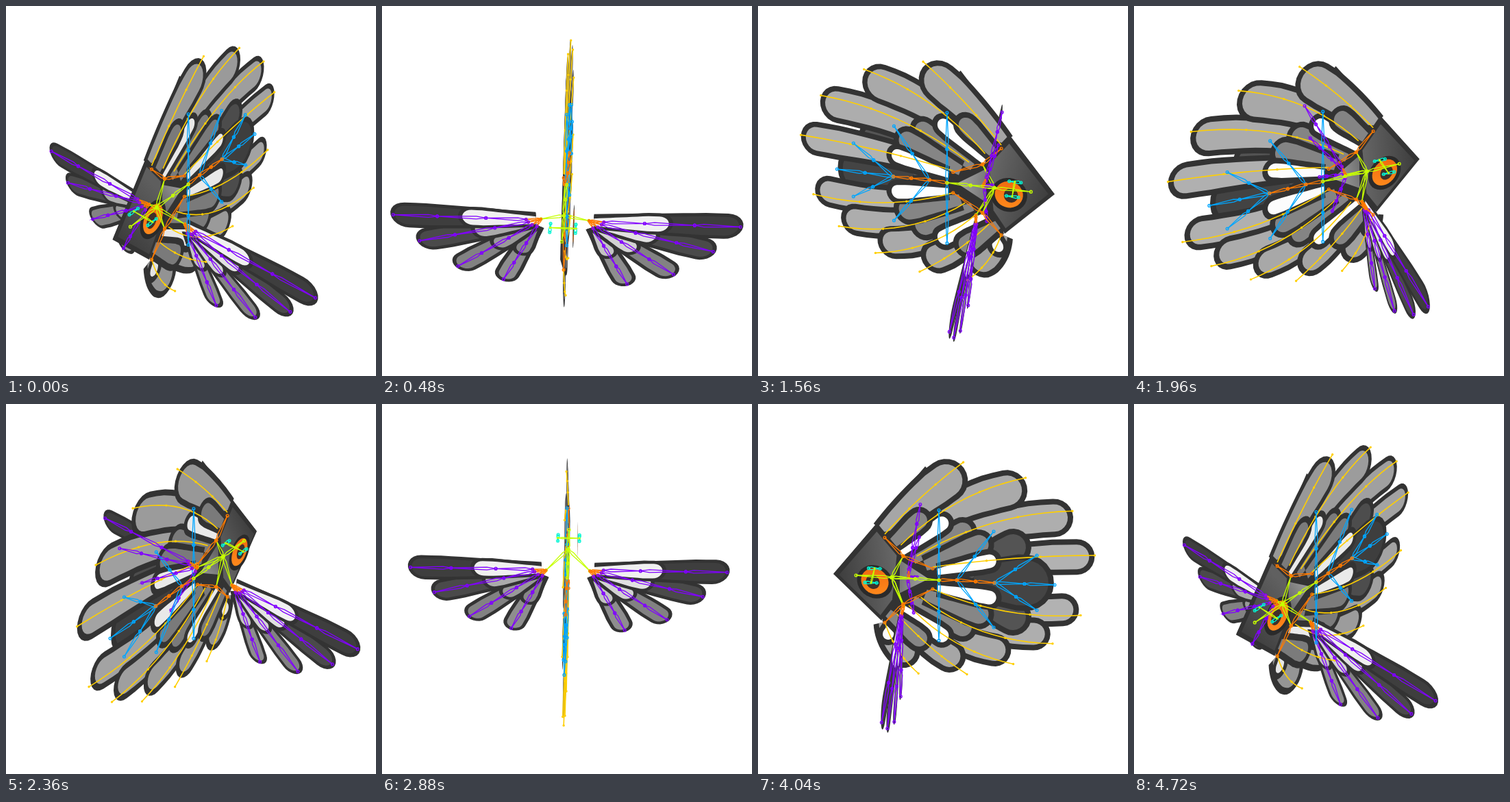
Animation of 540 by 540 pixels, one loop 4760 ms. Source, as an HTML page with a canvas:

```html
<!DOCTYPE html>
<html lang="en">
<head>
<meta charset="utf-8">
<title>Bird rig turntable</title>
<style>
html, body { margin: 0; width: 100%; height: 100%; overflow: hidden; background: #fff; }
canvas { display: block; width: 540px; height: 540px; }
</style>
</head>
<body>
<canvas id="stage" width="540" height="540"></canvas>
<script>
const ctx = document.getElementById('stage').getContext('2d');
const LOOP = 4760, STEP = 40, FACING_RIGHT = 1710, SIDE_VIEW = 4040;
const CX = 270, CY = 256, CAMERA = 940, SIN = 0.62, COS = 0.785;
const OUTLINE = 51, RIM = 8, DEG = Math.PI / 180;
const YELLOW = '#ffcf00', BLUE = '#00a6ff', PURPLE = '#8000ff';
const ORANGE = '#ff7a00', LIME = '#c6ff00', CYAN = '#00f5d4';

const turn = t => {
  const a = (t - FACING_RIGHT) / LOOP * 2 * Math.PI;
  return { c: Math.cos(a), s: Math.sin(a) };
};
let view = turn(0);

// Model axes: x forward, y up, z sideways.
function project([x, y, z]) {
  const u = x * view.c + z * view.s, w = z * view.c - x * view.s;
  const k = CAMERA / (CAMERA - w * COS - y * SIN);
  return [CX + u * k, CY - (y * COS - w * SIN) * k];
}

// The body is laid out as a side view and lifted onto the plane z = 0.
const side = turn(SIDE_VIEW);
function lift([px, py]) {
  const a = px - CX, b = CY - py, dx = -side.s * COS;
  const m = CAMERA * side.c + a * dx, n = a * SIN;
  const p = CAMERA * side.s * SIN + b * dx, q = CAMERA * COS + b * SIN;
  const det = m * q - n * p;
  return [CAMERA * (a * q - b * n) / det, CAMERA * (b * m - a * p) / det, 0];
}

const mix = (a, b, f) => a + (b - a) * f;
const between = (a, b, f) => a.map((v, i) => mix(v, b[i], f));
const range = (n, make) => Array.from({ length: n }, (_, i) => make(i));
const gray = v => { v = Math.round(v); return `rgb(${v},${v},${v})`; };

// Path from a to b, bowed sideways by the given amount.
function arc(a, b, bow = 0, n = 12) {
  const dx = b[0] - a[0], dy = b[1] - a[1], len = Math.hypot(dx, dy) || 1;
  return range(n + 1, i => {
    const f = i / n, off = 4 * f * (1 - f) * bow / len;
    return [a[0] + dx * f + dy * off, a[1] + dy * f - dx * off];
  });
}

function outlineOf(spine, radius, inset, taper) {
  const n = spine.length - 1, left = [], right = [];
  let angle = 0;
  spine.forEach(([x, y], i) => {
    const p = spine[Math.max(0, i - 1)], q = spine[Math.min(n, i + 1)];
    angle = Math.atan2(q[1] - p[1], q[0] - p[0]);
    const r = radius * mix(taper, 1, Math.min(1, i / n * 1.2)) - inset;
    left.push([x + Math.sin(angle) * r, y - Math.cos(angle) * r]);
    right.unshift([x - Math.sin(angle) * r, y + Math.cos(angle) * r]);
  });
  const tip = range(11, i => {
    const a = angle - Math.PI / 2 + Math.PI * (i + 1) / 12;
    return [spine[n][0] + Math.cos(a) * (radius - inset), spine[n][1] + Math.sin(a) * (radius - inset)];
  });
  return [...left, ...tip, ...right];
}

const makeFeather = (spine, r, tone, place = lift, rim = RIM, taper = 0.7) => ({
  tone,
  outer: outlineOf(spine, r, 0, taper).map(place),
  inner: outlineOf(spine, r, rim, taper).map(place)
});

function paint(points, fill) {
  ctx.beginPath();
  points.forEach(p => ctx.lineTo(...project(p)));
  ctx.closePath();
  ctx.fillStyle = fill;
  ctx.fill();
}

function drawFeathers(list, light) {
  for (const f of list) {
    paint(f.outer, gray(OUTLINE));
    paint(f.inner, gray(f.tone * light));
  }
}

// Fins fan out to an ellipse; the feathers end on a smaller one than their bones.
const onFan = (angle, rx, ry) =>
  [275 + rx * Math.cos(angle * DEG), 240 - ry * Math.sin(angle * DEG)];

function makeFin(up, i) {
  const f = i / (up > 0 ? 3 : 4);
  const angle = up > 0 ? 7 + 25.5 * i : -26 - 18.7 * i;
  const root = [255 - 70 * f, 254 - up * (16 + 48 * f)];
  const bow = up * 17 * Math.abs(Math.sin(2 * angle * DEG));
  return {
    feather: makeFeather(arc(root, onFan(angle * 1.08, 192, 128), bow * 0.8),
      up > 0 ? 26 + 2 * i : 24, 178 - 4 * i),
    bone: arc(root, onFan(angle, 218, 156), bow).map(lift)
  };
}
const finParts = [...range(4, i => makeFin(1, i)), ...range(5, i => makeFin(-1, i))];
const fins = finParts.map(f => f.feather);

const tail = [
  ...[1, -1].map(up => makeFeather(arc([288, 258 - 6 * up], [372, 260 - 51 * up]), 27, 84)),
  makeFeather(arc([315, 258], [391, 261]), 41, 68)
];

// Two mirrored fans of short feathers, the white ones above the gray.
function makeCovert(up, k) {
  const f = k / 4, angle = (18 + 18 * k) * DEG, white = k % 3 === 0;
  const tip = [235 + 108 * Math.cos(angle), 256 - up * 86 * Math.sin(angle)];
  const root = [262 - 72 * f, 257 - up * (12 + 36 * f)];
  return makeFeather(arc(root, tip), white ? 18 : 23 - f * 3, white ? 255 : 134);
}
const coverts = [2, 1, 0, 3, 4].flatMap(k => [makeCovert(1, k), makeCovert(-1, k)]);
const whitePatch = makeFeather(arc([193, 322], [190, 336]), 16, 250);

const crest = [[110, 248], [244, 91], [275, 125], [200, 215]].map(lift);
const mantle = [[178, 188], [255, 172], [300, 255], [250, 335], [182, 318]].map(lift);
const throat = [[200, 214], [264, 256], [200, 287]].map(lift);
const headRim = [[110, 248], [174, 174], [208, 215], [200, 290], [180, 316]].map(lift);
const toward = (pts, center, f) => pts.map(p => between(center, p, f));

const ROOT = [34, -26], WING_X = 57;

function makeWing(sign) {
  const place = ([z, y]) => [WING_X, y, sign * z];
  const at = (i, reach) => {
    const f = i / 3, angle = -64 * Math.pow(1 - f, 1.3) * DEG, len = (139 + 73 * f) * reach;
    return [ROOT[0] + len * Math.cos(angle), ROOT[1] + len * Math.sin(angle)];
  };
  const quill = (i, reach, width, tone) => {
    const r = (19 + 1.6 * i) * width, start = [ROOT[0] + 7, ROOT[1] - 10 + 3 * i];
    return makeFeather(arc(start, at(i, reach - (r - 4) / (139 + 24 * i))), r, tone, place, 6, 0.65);
  };
  const layer = (reach, width, tone) => range(4, i => quill(i, reach, width, tone(i)));
  return {
    root: [55, ROOT[1], sign * ROOT[0]],
    bones: range(4, i => [0.1, 0.37, 0.7, 1].map(f => place(at(i, f)))),
    quills: layer(1, 1, i => i < 2 ? 142 - 12 * i : 98 - 12 * i),
    near: layer(0.54, 0.85, i => 195 + 15 * i),
    far: layer(0.54, 0.85, i => i < 3 ? 135 + 18 * i : 240)
  };
}
const wings = { '1': makeWing(1), '-1': makeWing(-1) };

function drawWing(wing, isNear) {
  drawFeathers(wing.quills, 1);
  drawFeathers(isNear ? wing.near : wing.far, 1);
}

const ellipse = (x, y, rx, ry, z) => range(32, i => {
  const a = i * Math.PI / 16;
  return [x + rx * Math.cos(a), y + ry * Math.sin(a), z];
});

function ramp(a, b, from, to) {
  const g = ctx.createLinearGradient(...project(a), ...project(b));
  g.addColorStop(0, from);
  g.addColorStop(1, to);
  return g;
}

function drawHead(near, light) {
  const z = near * 14, back = [65, 20, 0];
  paint(headRim, gray(OUTLINE));
  paint(toward(headRim, [100, 0, near * 8], 0.86), ramp(headRim[0], back, gray(58), gray(104 * light)));
  paint(ellipse(98, 1, 26, 31, z), gray(42));
  paint(ellipse(98, 2, 20, 24, z), ramp([98, 28, z], [98, -26, z], '#f06a10', '#ff8a1c'));
  paint(ellipse(101, 1, 10, 13, z), '#40302a');
}

function joint(x, y, r) {
  ctx.beginPath();
  ctx.arc(x, y, r, 0, 7);
  ctx.stroke();
}

// A slim kite with a ring at each end.
function bone(a, b, color, width = 2, r = 1.9) {
  const [ax, ay] = project(a), [bx, by] = project(b);
  const len = Math.hypot(bx - ax, by - ay) || 1;
  const nx = (ay - by) / len * width, ny = (bx - ax) / len * width;
  const mx = mix(ax, bx, 0.2), my = mix(ay, by, 0.2);
  ctx.strokeStyle = color;
  ctx.lineWidth = 1.3;
  ctx.beginPath();
  ctx.moveTo(ax, ay);
  ctx.lineTo(mx + nx, my + ny);
  ctx.lineTo(bx, by);
  ctx.lineTo(mx - nx, my - ny);
  ctx.closePath();
  ctx.stroke();
  joint(ax, ay, r);
  joint(bx, by, r);
}

function chain(a, b, color, parts = 1) {
  for (let i = 0; i < parts; i++) {
    bone(between(a, b, i / parts), between(a, b, (i + 1) / parts), color);
  }
}

const HUB = lift([195, 253]), NOSE = lift([143, 250]), RUMP = lift([264, 257]);
const FORK = lift([290, 257]), STERN = lift([345, 261]);

function drawBones() {
  ctx.strokeStyle = YELLOW;
  ctx.lineWidth = 1.6;
  for (const fin of finParts) {
    ctx.beginPath();
    fin.bone.forEach(p => ctx.lineTo(...project(p)));
    ctx.stroke();
    [4, 8, 12].forEach(i => joint(...project(fin.bone[i]), 0.9));
  }
  for (const sign of [1, -1]) {
    const wing = wings[sign];
    bone(HUB, wing.root, LIME);
    for (const b of wing.bones) {
      bone(wing.root, b[0], ORANGE, 1.5, 1.2);
      for (let i = 0; i < 3; i++) bone(b[i], b[i + 1], PURPLE);
    }
    bone([112, 2, sign * 17], [95, 2, sign * 17], CYAN);

    const girdle = lift([212, 257 - 35 * sign]);
    bone(HUB, girdle, LIME);
    chain(girdle, lift([185, 257 - 62 * sign]), ORANGE);
    chain(girdle, lift([255, 255 - 15 * sign]), ORANGE);
    chain(RUMP, lift([264, 250 - 95 * sign]), BLUE, 2);
    chain(FORK, lift([344, 256 - 70 * sign]), BLUE, 2);
    chain(STERN, lift([407, 261 - 40 * sign]), BLUE, 2);
  }
  chain(STERN, lift([433, 264]), BLUE, 2);
  chain(RUMP, FORK, ORANGE);
  chain(FORK, STERN, ORANGE, 2);
  chain(HUB, NOSE, LIME);
  chain(HUB, RUMP, LIME, 2);
  bone([103, 2, -17], [103, 2, 17], LIME, 1, 1);
}

function draw(t) {
  view = turn(t);
  const near = view.c >= 0 ? 1 : -1;
  const light = 0.75 + 0.25 * Math.abs(view.c);
  ctx.fillStyle = '#fff';
  ctx.fillRect(0, 0, 540, 540);
  drawWing(wings[-near], false);
  if (near > 0) drawFeathers(tail, light);
  paint(crest, gray(OUTLINE));
  drawFeathers(fins, light);
  drawFeathers([whitePatch], light);
  if (near < 0) drawFeathers(tail, light);
  paint(mantle, gray(OUTLINE));
  drawFeathers(coverts, light);
  paint(throat, gray(OUTLINE));
  paint(toward(throat, [50, 0, 0], 0.66), ramp(HUB, RUMP, gray(105 * light), gray(185 * light)));
  drawHead(near, light);
  drawWing(wings[near], true);
  drawBones();
}

const start = performance.now();
function tick() {
  const t = (performance.now() - start) % LOOP;
  draw(Math.floor(t / STEP) * STEP);
  requestAnimationFrame(tick);
}
tick();
</script>
</body>
</html>
```
